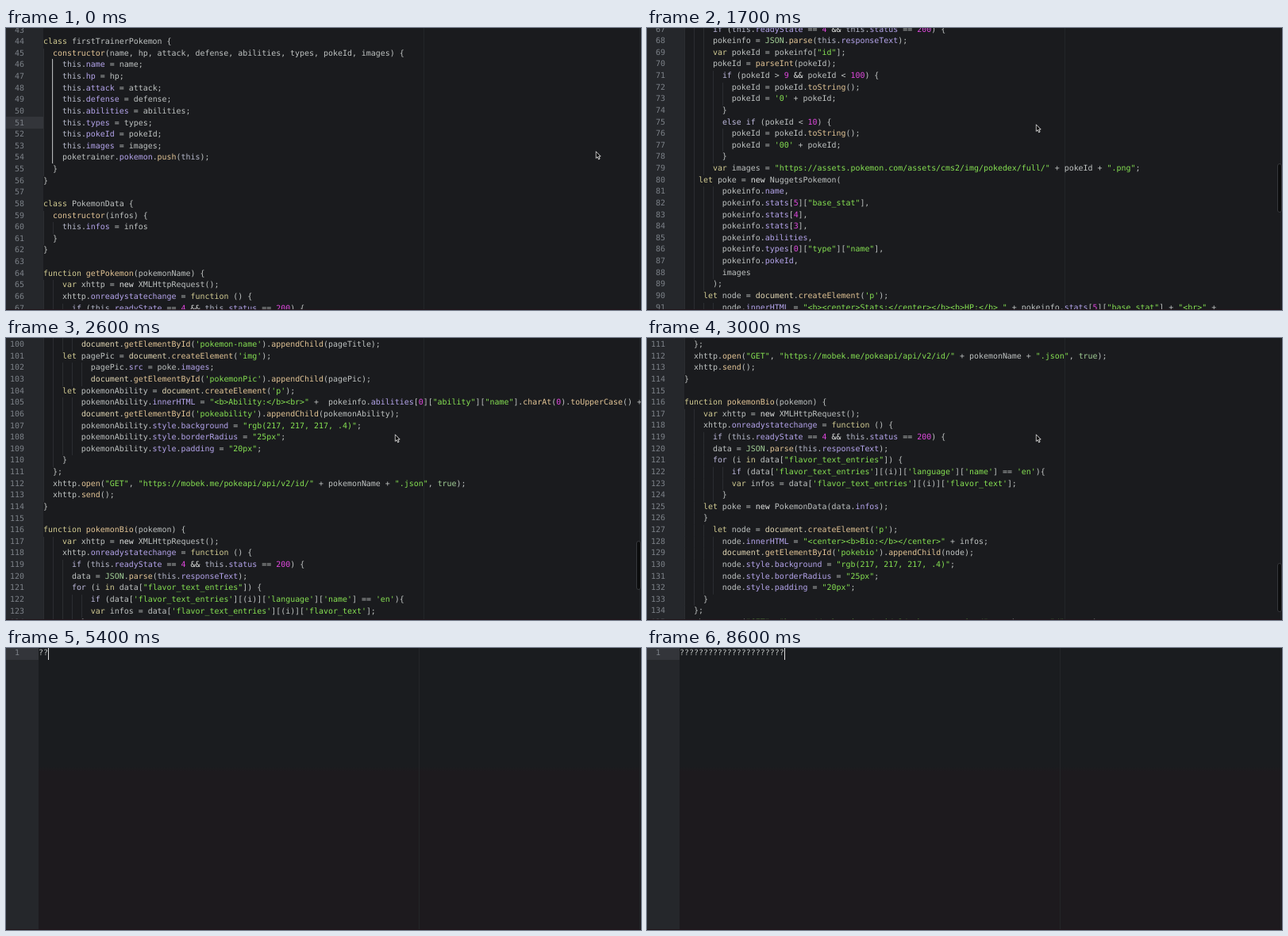
An HTML page that plays this animation: 800x356 px, repeating every 9000 ms.

```html
<!DOCTYPE html>
<html lang="en">
<head>
<meta charset="utf-8">
<title>Code editor</title>
<style>
html, body { margin: 0; width: 100%; height: 100%; overflow: hidden; background: #1a1b1e; }
.scene {
  position: absolute; left: 0; top: 0; width: 800px; height: 356px; overflow: hidden;
  background: #1a1b1e; color: #bfc3c2;
  font: 9.95px/14.63px "DejaVu Sans Mono", monospace; text-rendering: geometricPrecision;
}
.scene * { position: absolute; }
.scene pre, .scene pre * { position: static; }
.scene pre { position: absolute; margin: 0; top: 0; font: inherit; }
.gutter { left: 0; top: 0; width: var(--w); height: 100%; background: #25272b; }
.ruler { left: calc(var(--w) + 479px); top: 0; width: 1px; height: 100%; background: #232528; }
.edge { left: 798px; top: 0; width: 1px; height: 100%; background: #222427; }
.row { left: 0; width: var(--w); height: 14.63px; background: #33353a; }
.scene .nums { left: 0; width: calc(var(--w) - 24px); text-align: right; color: #7c8188; }
.scene .text { left: var(--w); }
.text div {
  height: 14.63px;
  background: repeating-linear-gradient(90deg, #2b2d31 0 1px, transparent 1px 2ch) 0 0 / calc(var(--n) * 1ch) 100% no-repeat;
}
#code { --w: 47px; }
#blank { --w: 41px; background: linear-gradient(#1a1c1f 150px, #1d1a1e 156px); }
#page { left: 0; top: -4.95px; width: 100%; }
#page pre { top: 1.5px; }
#scope { left: 58px; top: 43.9px; width: 1px; height: 131.7px; background: #b4b6b6; }
#thumb { left: 794px; width: 4px; height: 60px; background: #0b0c0d; border: 1px solid #36383c; border-radius: 3px; }
#mouse { left: 0; top: 0; }
#caret { top: 0; width: 1px; height: 14.5px; background: #e0e0e0; }
.base { left: 0; top: 355px; width: 100%; height: 1px; background: #20141a; }
.key { color: #d2cb92; }
.flow { color: #bdb9dc; }
.self { color: #b5b8c9; }
.fn { color: #e3c596; }
.prop { color: #b5a5ec; }
.num { color: #e048de; }
.str { color: #86e152; }
.obj { color: #e2d7b4; }
.lib { color: #a3cf97; }
.new { color: #e4e6e4; }
</style>
</head>
<body>
<div class="scene" id="code">
  <div class="gutter"></div><div class="ruler"></div><div class="edge"></div>
  <div id="page">
    <div class="row" style="top:117.04px"></div>
    <pre class="nums"></pre><pre class="text"></pre>
    <div id="scope"></div>
  </div>
  <div id="thumb"></div>
  <div class="base"></div>
  <svg id="mouse" width="9" height="13"><path d="M.7 .8V9.4L2.7 7.6 4.1 10.8 5.6 10.1 4.2 7H6.7Z" fill="#000" stroke="#eee" stroke-width=".9"/></svg>
</div>
<div class="scene" id="blank">
  <div class="gutter"></div><div class="ruler"></div><div class="edge"></div>
  <div class="row" style="top:0"></div>
  <pre class="nums">1</pre><pre class="text" id="typed"></pre>
  <div id="caret"></div>
  <div class="base"></div>
</div>
<script>
const FIRST = 43;
const source = `
class firstTrainerPokemon {
  constructor(name, hp, attack, defense, abilities, types, pokeId, images) {
    this.name = name;
    this.hp = hp;
    this.attack = attack;
    this.defense = defense;
    this.abilities = abilities;
    this.types = types;
    this.pokeId = pokeId;
    this.images = images;
    poketrainer.pokemon.push(this);
  }
}

class PokemonData {
  constructor(infos) {
    this.infos = infos
  }
}

function getPokemon(pokemonName) {
    var xhttp = new XMLHttpRequest();
    xhttp.onreadystatechange = function () {
      if (this.readyState == 4 && this.status == 200) {
      pokeinfo = JSON.parse(this.responseText);
      var pokeId = pokeinfo["id"];
      pokeId = parseInt(pokeId);
        if (pokeId > 9 && pokeId < 100) {
          pokeId = pokeId.toString();
          pokeId = '0' + pokeId;
        }
        else if (pokeId < 10) {
          pokeId = pokeId.toString();
          pokeId = '00' + pokeId;
        }
      var images = "https://assets.pokemon.com/assets/cms2/img/pokedex/full/" + pokeId + ".png";
   let poke = new NuggetsPokemon(
        pokeinfo.name,
        pokeinfo.stats[5]["base_stat"],
        pokeinfo.stats[4],
        pokeinfo.stats[3],
        pokeinfo.abilities,
        pokeinfo.types[0]["type"]["name"],
        pokeinfo.pokeId,
        images
      );
    let node = document.createElement('p');
        node.innerHTML = "<b><center>Stats:</center></b><b>HP:</b> " + pokeinfo.stats[5]["base_stat"] + "<br>" +
        "<b>Attack:</b> " + pokeinfo.stats[4]["base_stat"] + "<br>" +
        "<b>Defense:</b> " + pokeinfo.stats[3]["base_stat"];
        document.getElementById('pokestats').appendChild(node);
        node.style.background = "rgb(217, 217, 217, .4)";
        node.style.borderRadius = "25px";
        node.style.padding = "20px";
    let pageTitle = document.createElement('h1');
        pageTitle.innerHTML = pokeinfo.name;
        document.getElementById('pokemon-name').appendChild(pageTitle);
    let pagePic = document.createElement('img');
          pagePic.src = poke.images;
          document.getElementById('pokemonPic').appendChild(pagePic);
    let pokemonAbility = document.createElement('p');
        pokemonAbility.innerHTML = "<b>Ability:</b><br>" +  pokeinfo.abilities[0]["ability"]["name"].charAt(0).toUpperCase() +
        document.getElementById('pokeability').appendChild(pokemonAbility);
        pokemonAbility.style.background = "rgb(217, 217, 217, .4)";
        pokemonAbility.style.borderRadius = "25px";
        pokemonAbility.style.padding = "20px";
    }
  };
  xhttp.open("GET", "https://mobek.me/pokeapi/api/v2/id/" + pokemonName + ".json", true);
  xhttp.send();
}

function pokemonBio(pokemon) {
    var xhttp = new XMLHttpRequest();
    xhttp.onreadystatechange = function () {
      if (this.readyState == 4 && this.status == 200) {
      data = JSON.parse(this.responseText);
      for (i in data["flavor_text_entries"]) {
          if (data['flavor_text_entries'][(i)]['language']['name'] == 'en'){
          var infos = data['flavor_text_entries'][(i)]['flavor_text'];
        }
    let poke = new PokemonData(data.infos);
    }
      let node = document.createElement('p');
        node.innerHTML = "<center><b>Bio:</b></center>" + infos;
        document.getElementById('pokebio').appendChild(node);
        node.style.background = "rgb(217, 217, 217, .4)";
        node.style.borderRadius = "25px";
        node.style.padding = "20px";
    }
  };
  xhttp.open("GET", "https://pokeapi.co/api/v2/pokemon-species/" + pokemon + "/", true);
  xhttp.send();
}
`;

const tokens = new RegExp([
  /(?<str>"[^"]*"|'[^']*')/, /(?<num>\b\d+\b)/, /(?<key>\b(?:class|function|var|let|in)\b)/,
  /(?<flow>\b(?:if|else|for)\b)/, /(?<self>\bthis\b)/, /(?<new>\bnew\b|&&)/,
  /(?<obj>\bdocument\b)/, /(?<lib>\b(?:JSON|true)\b)/,
  /(?<fn>(?<!new )\b\w+(?=\())/, /(?<prop>(?<=\.)\w+)/, /(?<mark>[<&])/
].map(r => r.source).join('|'), 'g');

const $ = s => document.querySelector(s);
const escape = s => s.replace(/&/g, '&amp;').replace(/</g, '&lt;');

function paint(line) {
  const html = line.replace(tokens, (word, ...rest) => {
    const groups = rest.at(-1);
    const kind = Object.keys(groups).find(k => groups[k]);
    return `<span class="${kind}">${escape(word)}</span>`;
  });
  return `<div style="--n:${line.search(/\S|$/)}">${html}</div>`;
}

const lines = source.split('\n');
$('#code .text').innerHTML = lines.map(paint).join('');
$('#code .nums').textContent = lines.map((_, i) => FIRST + i).join('\n');

const clamp = v => Math.max(0, Math.min(1, v));
const stops = [[400, 0], [900, 141], [1700, 352], [2600, 828]];

function scrollAt(t) {
  if (t >= 2600) return 828 + 215 * (1 - (1 - clamp((t - 2600) / 800)) ** 2);
  const i = stops.findIndex(s => t < s[0]);
  if (i === 0) return 0;
  const [t0, y0] = stops[i - 1], [t1, y1] = stops[i];
  return y0 + (y1 - y0) * (t - t0) / (t1 - t0);
}

const typedAt = t => t < 4900 ? 0 : t < 5400 ? 1 : Math.min(22, 2 + Math.round((t - 5400) / 85));

const caretOff = [[4600, 4900], [5200, 5400], [7400, 7800], [8200, 8600]];

function draw(now) {
  const t = Math.floor(now % 9000 / 100) * 100;
  const reading = t < 4100;
  $('#code').style.display = reading ? 'block' : 'none';
  $('#blank').style.display = reading ? 'none' : 'block';
  if (reading) {
    const y = scrollAt(t);
    $('#page').style.transform = `translateY(${-y}px)`;
    $('#thumb').style.top = 109 + y * .177 + 'px';
    $('#thumb').style.display = y > 0 && t < 4000 ? 'block' : 'none';
    const u = clamp(t / 500), k = u * u * (3 - 2 * u);
    $('#mouse').style.transform = `translate(${742.5 - 253 * k}px, ${155 - 34 * k}px)`;
  } else {
    const n = typedAt(t);
    $('#typed').textContent = '?'.repeat(n);
    $('#caret').style.left = 41 + n * 5.99 + 'px';
    $('#caret').style.opacity = caretOff.some(([a, b]) => t >= a && t < b) ? 0 : 1;
  }
}

const start = performance.now();
function tick() {
  draw(performance.now() - start);
  requestAnimationFrame(tick);
}
tick();
</script>
</body>
</html>
```
